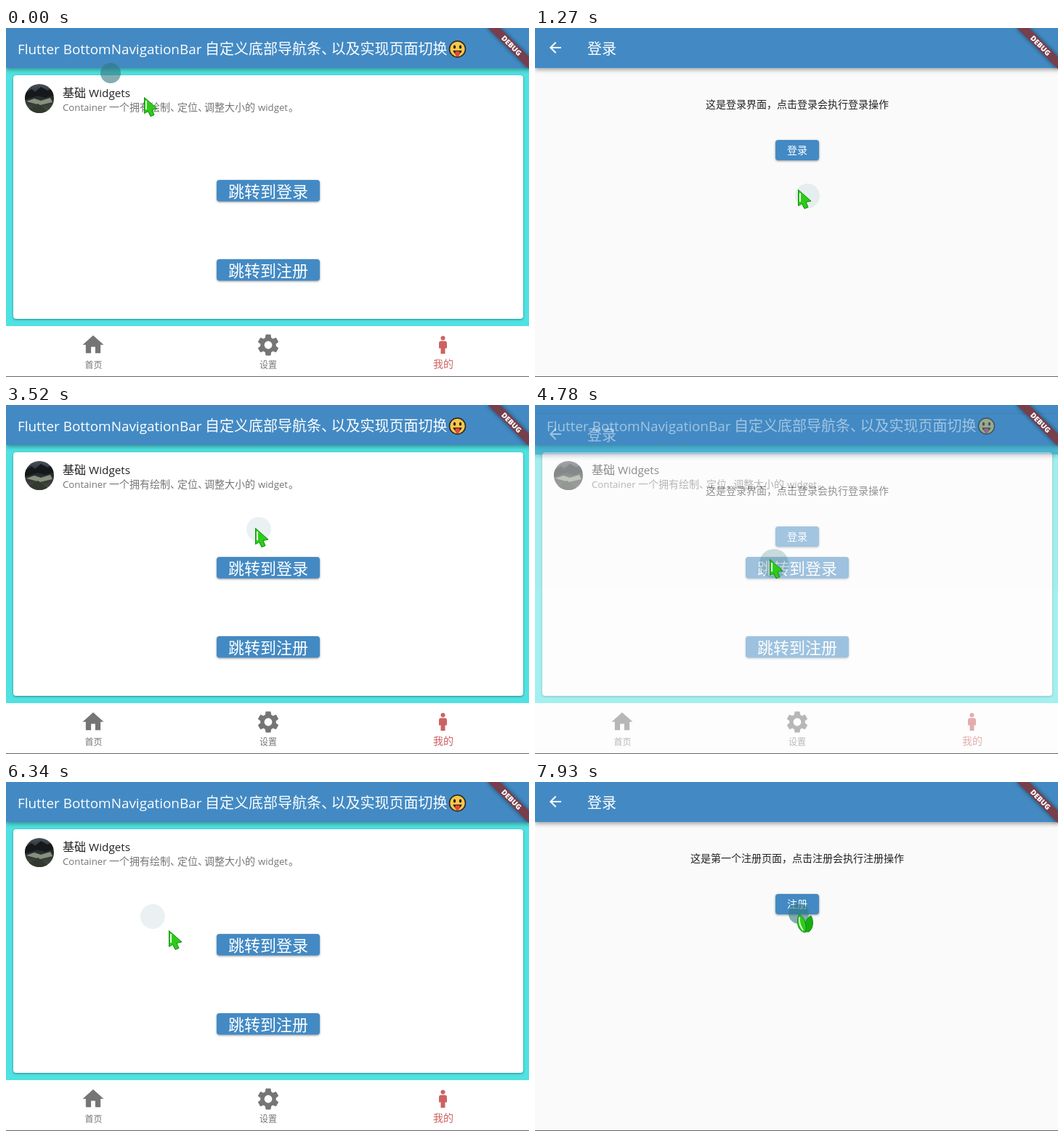
Write an HTML page that moves like this. It is 720x480 px and loops after 8000 ms.

```html
<!DOCTYPE html>
<html lang="zh">
<head>
<meta charset="utf-8">
<style>
html, body { margin: 0; width: 100%; height: 100%; overflow: hidden; background: #fafafa; }
svg { display: block; }
text { font-family: "Noto Sans CJK SC", "Noto Sans CJK", sans-serif; font-weight: 300; white-space: pre; }
.latin { font-family: "Open Sans", "Noto Sans", sans-serif; font-weight: 400; }
.mid { text-anchor: middle; }
.white { fill: #fff; }
.blue { fill: #438ac4; }
.raised { filter: drop-shadow(0 1.5px 1.5px rgba(0, 0, 0, .4)); }
.bar { filter: drop-shadow(0 2px 3px rgba(0, 0, 0, .4)); }
</style>
</head>
<body>
<svg width="720" height="480" viewBox="0 0 720 480">
  <defs>
    <clipPath id="round"><circle cx="46" cy="97" r="20"/></clipPath>
    <linearGradient id="photo" x2="0" y2="1">
      <stop offset="0" stop-color="#4a535d"/>
      <stop offset=".4" stop-color="#22272b"/>
      <stop offset="1" stop-color="#4a5142"/>
    </linearGradient>
  </defs>

  <g id="home">
    <rect width="720" height="480" fill="#50e2e2"/>
    <rect class="bar blue" width="720" height="55"/>
    <g class="white" font-size="20">
      <text class="latin" x="16" y="36" font-size="18.9">Flutter BottomNavigationBar</text>
      <text x="274" y="36">自定义底部导航条、</text>
      <text x="447.500" y="36">以及实现页面切换</text>
    </g>
    <g transform="translate(621.500 29)">
      <circle r="11" fill="#f8c64c" stroke="#2a2419" stroke-width="1.5"/>
      <ellipse cx="-4" cy="-3" rx="1.7" ry="2.5" fill="#2a2419"/>
      <ellipse cx="4" cy="-3" rx="1.7" ry="2.500" fill="#2a2419"/>
      <path d="M-6 2H6Q5 7 0 7T-6 2Z" fill="#2a2419"/>
      <path d="M-3 3H3V7A3 3 0 0 1-3 7Z" fill="#e4483e"/>
    </g>

    <rect class="raised white" x="10" y="65" width="702" height="335" rx="4"/>
    <g clip-path="url(#round)">
      <rect x="26" y="77" width="40" height="40" fill="url(#photo)"/>
      <path d="M26 90L35 84 40 88 48 81 57 86 66 82V92L54 96 43 93 26 99Z" fill="#15191b"/>
      <path d="M28 101L39 97 48 100 61 96 64 102 47 106Z" fill="#87907f"/>
      <path d="M30 113L44 104 61 117H34Z" fill="#32392f"/>
    </g>
    <g fill="#222">
      <text x="78" y="95" font-size="16">基础</text>
      <text class="latin" x="114" y="95" font-size="15.3">Widgets</text>
    </g>
    <g fill="#757575" font-size="14">
      <text class="latin" x="78" y="114" font-size="13.2">Container</text>
      <text x="142" y="114">一个拥有绘制、</text>
      <text x="236" y="114">定位、</text>
      <text x="273" y="114">调整大小的</text>
      <text class="latin" x="347" y="114" font-size="13.2">widget</text>
      <text x="389" y="114">。</text>
    </g>
    <rect class="raised blue" x="290" y="209" width="142" height="29.500" rx="4"/>
    <rect class="raised blue" x="290" y="318" width="142" height="29.500" rx="4"/>
    <g class="white mid" font-size="22">
      <text x="361" y="233">跳转到登录</text>
      <text x="361" y="342">跳转到注册</text>
    </g>

    <rect class="white" y="410" width="720" height="70"/>
    <g fill="#757575" class="mid" font-size="12">
      <path transform="translate(102.600 418.300) scale(1.45)" d="M10 20v-6h4v6h5v-8h3L12 3 2 12h3v8z"/>
      <path transform="translate(343 418) scale(1.5)" d="M19.14 12.94c.04-.3.06-.61.06-.94 0-.32-.02-.64-.07-.94l2.03-1.58c.18-.14.23-.41.12-.61l-1.92-3.32c-.12-.22-.37-.29-.59-.22l-2.39.96c-.5-.38-1.03-.7-1.62-.94l-.36-2.54c-.04-.24-.24-.41-.48-.41h-3.84c-.24 0-.43.17-.47.41l-.36 2.54c-.59.24-1.13.57-1.62.94l-2.39-.96c-.22-.08-.47 0-.59.22L2.74 8.87c-.12.21-.08.47.12.61l2.03 1.58c-.05.3-.09.63-.09.94s.02.64.07.94l-2.03 1.58c-.18.14-.23.41-.12.61l1.92 3.32c.12.22.37.29.59.22l2.39-.96c.5.38 1.03.7 1.62.94l.36 2.54c.05.24.24.41.48.41h3.84c.24 0 .44-.17.47-.41l.36-2.54c.59-.24 1.13-.56 1.62-.94l2.39.96c.22.08.47 0 .59-.22l1.92-3.32c.12-.22.07-.47-.12-.61zM12 15.6a3.600 3.600 0 1 1 0-7.200 3.600 3.600 0 0 1 0 7.200z"/>
      <text x="120.500" y="468">首页</text>
      <text x="361" y="468">设置</text>
    </g>
    <g fill="#cd6262">
      <circle cx="601.500" cy="426.500" r="3"/>
      <path d="M599 430.500h5q3 0 3 3v7h-2.500v7.500h-6v-7.500H596v-7q0-3 3-3z"/>
      <text class="mid" x="602" y="467" font-size="14">我的</text>
    </g>
  </g>

  <g id="page">
    <rect width="720" height="480" fill="#fafafa"/>
    <rect class="bar blue" width="720" height="55"/>
    <path class="white" transform="translate(16 15)" d="M20 11H7.83l5.59-5.59L12 4l-8 8 8 8 1.41-1.41L7.83 13H20v-2z"/>
    <text class="white" x="72" y="35.500" font-size="20">登录</text>
    <text id="info" class="mid" x="361" y="110" font-size="14" fill="#222"></text>
    <rect class="raised blue" x="331" y="154" width="60" height="28" rx="4"/>
    <text id="action" class="mid white" x="361" y="173" font-size="14"></text>
  </g>

  <g transform="translate(720 0) rotate(45)">
    <rect x="-40" y="28" width="80" height="12" fill="#773f4b" style="filter:drop-shadow(0 0 3px rgba(0,0,0,.5))"/>
    <text class="latin mid white" y="37.700" font-size="10" style="font-weight:800">DEBUG</text>
  </g>
  <rect y="479" width="720" height="1" fill="#666"/>

  <circle id="ripple" fill="#327881"/>
  <g id="cursor" stroke="#0c8f0c" stroke-linejoin="round">
    <g id="arrow">
      <path d="M.5.5V22.500L5.500 19.500 9 26.500 14 24.500 11 17.500 18 16Z" fill="#2fcb1a"/>
      <path d="M3 5V17" stroke="#e6ffe0" stroke-width="2"/>
    </g>
    <g id="hand">
      <path d="M10 24C9 13 13 4 19 2 23 9 22 20 16 24Z" fill="#17ad10"/>
      <path d="M3 0C11 5 14 17 11 25 2 24-3 11 3 0Z" fill="#2fcb1a"/>
      <path d="M3 4Q2 14 8 22" fill="none" stroke="#e6ffe0" stroke-width="1.800"/>
    </g>
  </g>
</svg>
<script>
const $ = id => document.getElementById(id);
const LOOP = 8000, TICK = 176, LEAD = 18;

// Cursor stops: tick, x, y
const stops = [
  [0, 190, 95], [5, 375, 231], [7, 362, 222], [15, 391, 173], [18, 348, 171],
  [20, 343, 169], [26, 329, 218], [27, 323, 212], [31, 362, 170], [34, 202, 185],
  [36, 224, 204], [41, 360, 333], [44, 364, 184], [45, 361, 182]
];
// Clicks: tick, x, y, and the page they lead to, if any
const clicks = [
  [0, 144, 62], [5, 375, 231, "login"], [15, 397, 174], [18, 348, 171, "home"],
  [26, 329, 218, "login"], [31, 362, 170, "home"], [34, 202, 185],
  [41, 360, 333, "register"], [45, 363, 181]
];
const ripples = [[14, .6], [20, .26], [17, .1]];
const texts = {
  login: ["这是登录界面，点击登录会执行登录操作", "登录"],
  register: ["这是第一个注册页面，点击注册会执行注册操作", "注册"]
};

function cursorAt(tick) {
  const next = stops.findIndex(s => s[0] > tick);
  if (next < 0) return stops.at(-1).slice(1);
  const [t0, x0, y0] = stops[next - 1], [t1, x1, y1] = stops[next];
  const u = (tick - t0) / (t1 - t0), e = u * u * (3 - 2 * u);
  return [x0 + (x1 - x0) * e, y0 + (y1 - y0) * e];
}

// How far the second page is open, from 0 to 1
function openness(tick, nav) {
  if (!nav) return 0;
  const done = [0, .6, 1][Math.min(2, tick - nav[0])];
  return nav[3] === "home" ? 1 - done : done;
}

function overButton(x, y, open) {
  const inside = (l, t, r, b) => x >= l && x <= r && y >= t && y <= b;
  if (open === 1) return inside(331, 154, 391, 184);
  return open === 0 && (inside(290, 209, 432, 239) || inside(290, 318, 432, 348));
}

const show = (id, on) => $(id).setAttribute("visibility", on ? "visible" : "hidden");
const set = (id, attrs) => Object.entries(attrs).forEach(([k, v]) => $(id).setAttribute(k, v));

function draw(ms) {
  const tick = Math.floor((ms % LOOP + LEAD) / TICK);
  const past = clicks.filter(c => c[0] <= tick);
  const open = openness(tick, past.filter(c => c[3]).at(-1));

  const [info, action] = texts[tick < 41 ? "login" : "register"];
  $("info").textContent = info;
  $("action").textContent = action;
  set("page", {
    opacity: open ** 1.4,
    transform: `translate(0 ${Math.round(120 * (1 - open) ** 2.43)})`
  });

  const [start, cx, cy] = past.at(-1);
  const [r, opacity] = ripples[tick - start] || [0, 0];
  set("ripple", { cx, cy, r, opacity });

  const [x, y] = cursorAt(tick), hover = overButton(x, y, open);
  set("cursor", { transform: `translate(${x} ${y})` });
  show("arrow", !hover);
  show("hand", hover);
}

const begin = performance.now();
function loop() {
  draw(performance.now() - begin);
  requestAnimationFrame(loop);
}
loop();
</script>
</body>
</html>
```
